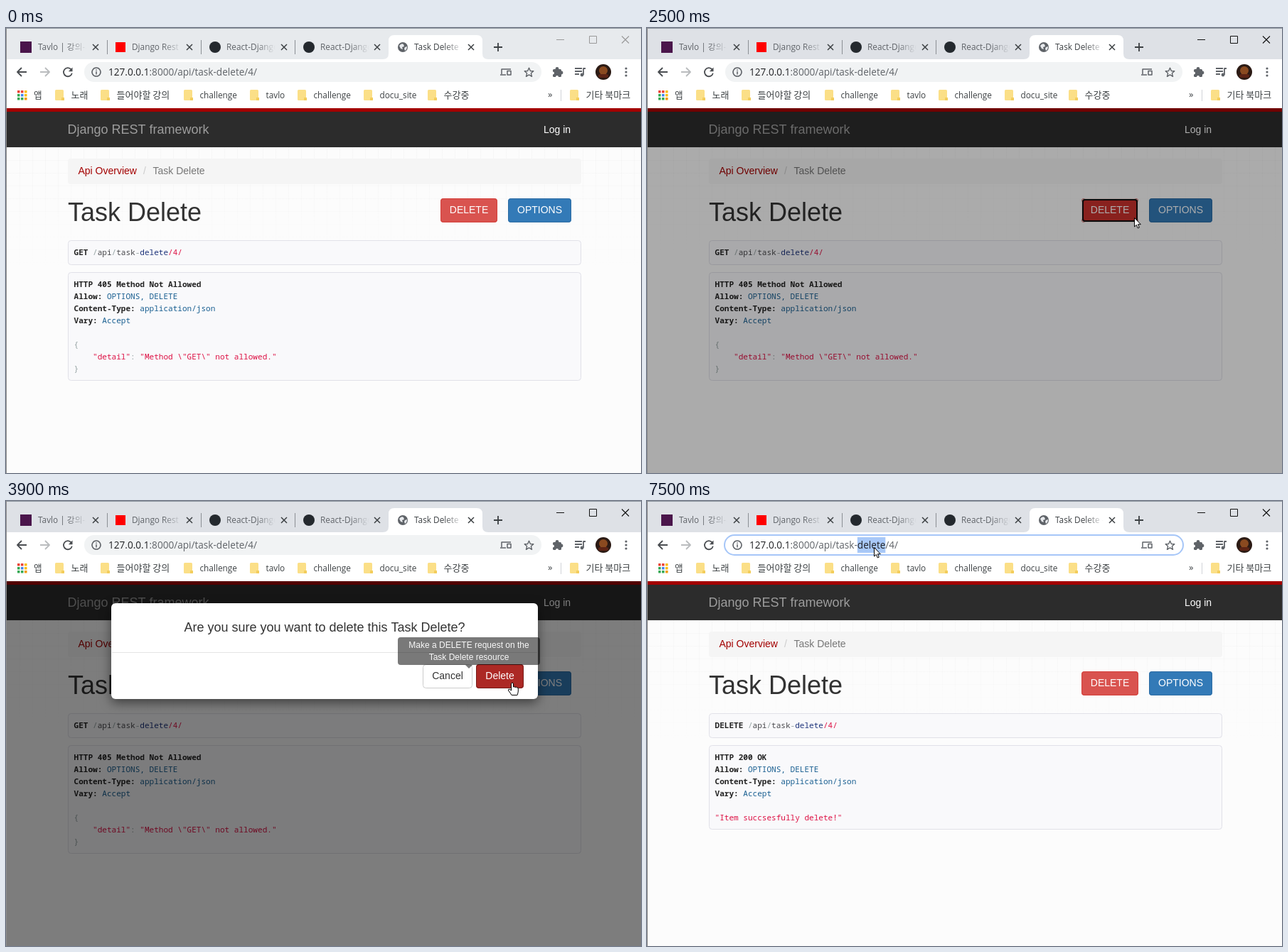
An HTML page with a canvas for the animation above (8000 ms loop, 893 px wide and 627 px high).

```html
<!DOCTYPE html>
<html lang="ko">
<head>
<meta charset="utf-8">
<title>Task Delete</title>
<style>
html, body { margin: 0; width: 100%; height: 100%; overflow: hidden; background: #fff; }
canvas { display: block; }
</style>
</head>
<body>
<canvas id="stage" width="893" height="627"></canvas>
<script>
const W = 893, H = 627, LOOP = 8000, STEP = 100;
const stage = document.getElementById('stage').getContext('2d');
const layer = document.createElement('canvas');
layer.width = W;
layer.height = H;
const layerCtx = layer.getContext('2d');
let c = stage;

const UI = '"Open Sans", "Noto Sans CJK KR", "Noto Sans CJK", sans-serif';
const KO = '"Noto Sans CJK KR", "Noto Sans CJK", sans-serif';
const SANS = '"Liberation Sans", Arial, sans-serif';
const MONO = '"Noto Sans Mono", "DejaVu Sans Mono", monospace';
const GRAY = '#5f6368', DARK = '#202124';
const INK = '#48484c', PUNCT = '#93a1a1', BLUE = '#195f91', RED = '#dd1144', NAVY = '#1e347b';

const clamp = v => Math.max(0, Math.min(1, v));
const ramp = (t, from, len) => clamp((t - from) / len);
const within = (t, from, to) => t >= from && t < to;

// ---- drawing helpers ----
function rect(x, y, w, h, color) {
  c.fillStyle = color;
  c.fillRect(x, y, w, h);
}
function box(x, y, w, h, r, fill, line) {
  c.beginPath();
  c.roundRect(x, y, w, h, r);
  c.fillStyle = fill;
  c.fill();
  if (!line) return;
  c.beginPath();
  c.roundRect(x + .5, y + .5, w - 1, h - 1, r);
  c.lineWidth = 1;
  c.strokeStyle = line;
  c.stroke();
}
function disc(x, y, r, color) {
  c.beginPath();
  c.arc(x, y, r, 0, Math.PI * 2);
  c.fillStyle = color;
  c.fill();
}
function path(d, x, y, line, width, fill) {
  const p = new Path2D(d);
  c.save();
  c.translate(x, y);
  c.lineJoin = 'round';
  if (fill) { c.fillStyle = fill; c.fill(p); }
  if (line) { c.strokeStyle = line; c.lineWidth = width; c.stroke(p); }
  c.restore();
}
function text(s, x, y, size, family, color, align = 'left') {
  c.font = size + 'px ' + family;
  c.fillStyle = color;
  c.textAlign = align;
  c.fillText(s, x, y);
  return c.measureText(s).width;
}

// ---- browser window ----
const CROSS = 'M-4 -4L4 4M4 -4L-4 4';

function tabTitle(s, x, end, color) {
  const fade = c.createLinearGradient(end - 26, 0, end, 0);
  fade.addColorStop(0, color);
  fade.addColorStop(1, color + '00');
  text(s, x, 31, 11.8, UI, fade);
}

function tabs(active) {
  rect(0, 0, W, 45, active ? '#dee1e6' : '#e7eaed');
  path('M530 44Q538 44 538 36V18Q538 10 546 10H662Q670 10 670 18V36Q670 44 678 44Z', 0, 0, null, 0, '#fff');
  rect(20, 19, 16, 16, '#4a154b');
  rect(154, 20, 14, 14, '#ff0000');
  disc(294, 27, 8, '#24292e');
  disc(426, 27, 8, '#24292e');
  disc(558, 27, 7, GRAY);
  path('M-5 -2Q-2 -6 1 -4L2 -1L-1 0L0 3L-3 2ZM3 0L6 -1Q6 3 3 5L2 2Z', 558, 27, null, 0, '#e8eaed');
  tabTitle('Tavlo | 강의-자료', 45, 113, GRAY);
  tabTitle('Django Rest Fr', 177, 247, GRAY);
  tabTitle('React-Django', 310, 379, GRAY);
  tabTitle('React-Django', 442, 511, GRAY);
  tabTitle('Task Delete –', 574, 642, '#3c4043');
  for (const x of [126, 258, 391, 522, 654]) path(CROSS, x, 27, '#3c4043', 1.5);
  for (const x of [142, 274, 406]) rect(x, 17, 1, 20, '#8b8f94');
  path('M-6 0H6M0 -6V6', 692, 27, '#3c4043', 1.8);

  const ctl = active ? '#111' : '#999';
  rect(774, 16, 11, 1, ctl);
  path('M.5 .5H10.5V10.5H.5Z', 820, 11, ctl, 1);
  path('M-5 -5L5 5M5 -5L-5 5', 871, 16.5, ctl, 1.1);
}

function urlState(t) {
  if (within(t, 700, 1100) || within(t, 5700, 6100) || within(t, 6300, 6700) || within(t, 6900, 7300)) return 'all';
  if (within(t, 1100, 2400)) return 'caret';
  return t >= 6100 ? 'word' : 'idle';
}

function address(t) {
  const state = urlState(t);
  if (state === 'idle') box(110, 48, 643, 28, 14, '#f1f3f4');
  else {
    box(108, 47, 647, 30, 15, '#a6c6f8');
    box(110, 49, 643, 26, 13, '#fff');
  }
  path('M0 -6A6 6 0 1 0 .01 -6M0 -1V3.5M0 -3.5V-2', 127, 62, GRAY, 1.5);

  const host = '127.0.0.1', rest = ':8000/api/task-', word = 'delete', tail = '/4/';
  c.font = '13.6px ' + UI;
  const width = s => c.measureText(s).width;
  const x = 144, lead = x + width(host + rest), full = width(host + rest + word + tail);
  if (state === 'all') rect(x, 51, full, 22, '#a8c8f8');
  if (state === 'word') rect(lead, 51, width(word), 22, '#a8c8f8');
  const dim = state === 'all' ? DARK : GRAY;
  text(host, x, 67, 13.6, UI, DARK);
  text(rest, x + width(host), 67, 13.6, UI, dim);
  text(word, lead, 67, 13.6, UI, state === 'word' ? DARK : dim);
  text(tail, lead + width(word), 67, 13.6, UI, dim);
  if (state === 'caret' && Math.floor((t - 1100) / 500) % 2 === 0) rect(353, 53, 1, 18, '#000');

  if (!within(t, 4100, 4300)) {
    path('M-6 3V-4H7M-8 4H0M2 -1.5H7V4H2Z', 703, 62, GRAY, 1.5);
  }
  path('M0 -6.3L1.9 -2L6.3 -1.7L2.9 1.3L4 5.8L0 3.4L-4 5.8L-2.9 1.3L-6.3 -1.7L-1.9 -2Z', 735.5, 62.5, GRAY, 1.4);
}

function toolbar(t) {
  rect(0, 44, W, 69, '#fff');
  path('M7 0H-6M0 -6L-6 0L0 6', 22, 62, '#4a4d51', 1.8);
  path('M-7 0H6M0 -6L6 0L0 6', 55, 62, '#babcbe', 1.8);
  path('M4.6 -3.6A6 6 0 1 0 5.8 1.6', 87, 62, '#4a4d51', 1.8);
  path('M6.5 -6.5V-.8H.8Z', 87, 62, null, 0, '#4a4d51');
  address(t);

  box(769, 58, 12, 11, 1.5, GRAY);
  disc(775, 57.5, 2.4, GRAY);
  disc(781, 63, 2.4, GRAY);
  disc(769, 63.5, 2, '#fff');
  disc(775, 69, 2, '#fff');
  path('M-7 -5H3M-7 -1H3M-7 3H-1M5 4V-5H8', 807, 62, GRAY, 1.8);
  disc(803 + 7, 66, 2.4, GRAY);
  disc(840, 62, 11, '#2b1a14');
  disc(840, 60, 6, '#8a4a20');
  box(833, 65, 14, 5, 2.5, '#5c2415');
  for (const y of [57, 62, 67]) disc(872, y, 1.6, GRAY);
}

function bookmarks() {
  const dots = ['#ea4335', '#ea4335', '#fbbc04', '#34a853', '#4285f4', '#fbbc04', '#34a853', '#34a853', '#f29900'];
  dots.forEach((color, i) => rect(16 + i % 3 * 5, 88 + Math.floor(i / 3) * 5, 3.5, 3.5, color));
  text('앱', 39, 98.5, 12.6, KO, '#3c4043');
  const items = [[69, '노래'], [133, '들어야할 강의'], [250, 'challenge'], [343, 'tavlo'],
    [410, 'challenge'], [503, 'docu_site'], [593, '수강중'], [793, '기타 북마크']];
  for (const [x, label] of items) {
    box(x, 87, 12, 15, 1.5, '#fbdf87');
    rect(x + 9, 98, 4, 4, '#f3cd5c');
    const latin = label < '~';
    text(label, x + 22.5, 98.5, latin ? 11.8 : 13, latin ? UI : KO, '#3c4043');
  }
  text('»', 762, 98, 13, UI, '#3c4043');
  rect(780, 87, 1, 16, '#d0d3d7');
}

// ---- page ----
function button(x, y, w, label, fill, line, color = '#fff') {
  box(x, y, w, 34, 4, fill, line);
  text(label, x + w / 2, y + 21, 14, SANS, color, 'center');
}

function ring(x, y, w, h) {
  c.beginPath();
  c.roundRect(x + .5, y + .5, w - 1, h - 1, 4);
  c.strokeStyle = '#f4e4e3';
  c.lineWidth = 1;
  c.stroke();
  c.beginPath();
  c.roundRect(x + 2, y + 2, w - 4, h - 4, 3);
  c.strokeStyle = '#101010';
  c.lineWidth = 2;
  c.stroke();
}

function code(y, ...parts) {
  let x = 95.5;
  for (const [s, color] of parts) {
    const bold = color === 'b';
    c.font = (bold ? 'bold ' : '') + '11.05px ' + MONO;
    c.fillStyle = bold ? '#222' : color;
    c.textAlign = 'left';
    c.fillText(s, x, y);
    x += c.measureText(s).width;
  }
}

function grid() {
  const fade = c.createLinearGradient(0, 168, 0, 350);
  fade.addColorStop(0, 'rgba(0,0,0,.022)');
  fade.addColorStop(1, 'rgba(0,0,0,0)');
  for (let x = 1; x < W; x += 18) rect(x, 168, 1, 182, fade);
  for (let y = 168; y < 350; y += 18) rect(1, y, W, 1, fade);
}

function page(t) {
  const done = t >= 4100, plain = within(t, 4100, 4300);
  rect(1, 113, W, H, '#fcfcfc');
  grid();
  rect(1, 113, W, 5, '#a30000');
  rect(1, 118, W, 50, '#2c2c2c');
  text('Django REST framework', 86.5, 149, 18, SANS, '#9d9d9d');
  text('Log in', 756, 148, 14, SANS, '#fff');

  box(87, 184, 722, 36, 4, '#f5f5f5');
  text('Api Overview', 101.5, 206, 14, SANS, '#a30000');
  text('/', 193, 206, 14, SANS, '#ccc');
  text('Task Delete', 206.5, 206, 14, SANS, '#777');
  text('Task Delete', 87, 272, 36, SANS, '#333');

  if (within(t, 2400, 2500)) button(611, 240, 80, 'DELETE', '#ac2925', '#761c19');
  else if (within(t, 2000, 4100)) button(611, 240, 80, 'DELETE', '#c9302c', '#ac2925');
  else button(611, 240, 80, 'DELETE', '#d9534f', '#d43f3a');
  if (within(t, 2400, 4100)) ring(611, 240, 80, 34);
  if (within(t, 4200, 4800)) button(706, 240, 89, 'OPTIONS', '#286090', '#204d74');
  else button(706, 240, 89, 'OPTIONS', '#337ab7', '#2e6da4');

  box(87, 299, 722, 35, 4, '#f9f9fb', '#e1e1e8');
  box(87, 344, 722, done ? 119 : 153, 4, '#f9f9fb', '#e1e1e8');
  const tone = color => plain ? INK : color;
  code(320, [done ? 'DELETE' : 'GET', 'b'], [' /', tone(PUNCT)], ['api', INK], ['/', tone(PUNCT)],
    ['task', INK], ['-', tone(PUNCT)], ['delete', tone(NAVY)], ['/4/', tone(RED)]);
  code(365, [done ? 'HTTP 200 OK' : 'HTTP 405 Method Not Allowed', 'b']);
  code(382, ['Allow:', 'b'], [' OPTIONS, DELETE', BLUE]);
  code(399, ['Content-Type:', 'b'], [' application/json', BLUE]);
  code(416, ['Vary:', 'b'], [' Accept', BLUE]);
  if (done) {
    code(450, ['"Item succsesfully delete!"', tone(RED)]);
  } else {
    code(450, ['{', PUNCT]);
    code(467, ['    "detail"', RED], [':', PUNCT], [' "Method \\"GET\\" not allowed."', RED]);
    code(484, ['}', PUNCT]);
  }
}

// ---- confirm dialog ----
function dialog(t) {
  c = layerCtx;
  c.clearRect(0, 0, W, H);
  c.save();
  c.shadowColor = 'rgba(0,0,0,.5)';
  c.shadowBlur = 15;
  c.shadowOffsetY = 5;
  box(148, 144, 600, 135, 6, '#fff');
  c.restore();
  text('Are you sure you want to delete this Task Delete?', 448, 184, 18, SANS, '#333', 'center');
  rect(149, 213, 598, 1, '#e5e5e5');
  button(586, 230, 70, 'Cancel', '#fff', '#ccc', '#333');
  if (t >= 3900) button(661, 230, 67, 'Delete', '#ac2925', '#761c19');
  else if (t >= 3300) button(661, 230, 67, 'Delete', '#c9302c', '#ac2925');
  else button(661, 230, 67, 'Delete', '#d9534f', '#d43f3a');
  if (t >= 4000) ring(661, 230, 67, 34);
  c = stage;

  const left = 1 - ramp(t, 2555, 300);
  c.globalAlpha = ramp(t, 2546, 150);
  c.drawImage(layer, 0, Math.round(-34 * Math.pow(left, 1.2)));
  c.globalAlpha = 1;
}

function tooltip(t) {
  const alpha = .9 * ramp(t, 2830, 150) * (1 - ramp(t, 3850, 120));
  if (!alpha) return;
  c.globalAlpha = alpha;
  box(551, 192, 200, 39, 4, '#000');
  path('M-5 0H5L0 5Z', 651, 231, null, 0, '#000');
  c.globalAlpha = Math.min(1, alpha * 1.8);
  text('Make a DELETE request on the', 651, 207, 12, SANS, '#fff', 'center');
  text('Task Delete resource', 651, 224, 12, SANS, '#fff', 'center');
  c.globalAlpha = 1;
}

function overlay(t) {
  if (!within(t, 2500, 4100)) return;
  rect(1, 113, W, H, `rgba(0,0,0,${.5 * ramp(t, 2410, 140)})`);
  dialog(t);
  tooltip(t);
}

// ---- pointer ----
const TRACK = [[100, 470, 640], [700, 400, 64], [1300, 400, 64], [1700, 728, 300], [2000, 675, 268],
  [2400, 675, 268], [2500, 685, 267], [2800, 687, 267], [3200, 687, 267], [3300, 710, 262], [3400, 710, 262],
  [3700, 712, 256], [4700, 712, 256], [5400, 158, 56], [5600, 320, 63], [5700, 320, 65], [7400, 320, 65],
  [7500, 319, 65], [8000, 319, 65]];
const SHAPES = {
  arrow: 'M.5 .5V13L3.3 10.4L5.3 15L7.3 14.1L5.4 9.7H9.3Z',
  hand: 'M-1.5 1Q0 -1 1.5 1V6Q3 5 4 6.5Q5.5 5.5 6.5 7Q8 6.3 8.3 8V12Q8 15 7 17.5H-1Q-3 14 -5.5 11Q-6 9 -4 9L-1.5 11Z',
  beam: 'M-3 -8H-1L0 -7L1 -8H3M0 -7V7M-3 8H-1L0 7L1 8H3'
};

function pointer(t) {
  if (t < TRACK[0][0]) return;
  const i = TRACK.findIndex(k => k[0] > t);
  const [t0, x0, y0] = TRACK[i - 1], [t1, x1, y1] = TRACK[i];
  const k = (t - t0) / (t1 - t0);
  const x = Math.round(x0 + (x1 - x0) * k), y = Math.round(y0 + (y1 - y0) * k);
  if (within(t, 2000, 2500) || within(t, 3300, 4800)) path(SHAPES.hand, x, y, '#000', 1, '#fff');
  else if (y < 76 && t < 5700) path(SHAPES.beam, x, y, '#000', 1);
  else path(SHAPES.arrow, x, y, '#000', 1, '#fff');
}

function draw(t) {
  tabs(t >= 700);
  toolbar(t);
  bookmarks();
  page(t);
  overlay(t);
  rect(0, 0, W, 1, '#8d959e');
  rect(0, 0, 1, H, '#8c8c8c');
  pointer(t);
}

const start = performance.now();
function frame() {
  const t = (performance.now() - start) % LOOP;
  draw(Math.floor(t / STEP) * STEP);
  requestAnimationFrame(frame);
}
frame();
</script>
</body>
</html>
```
